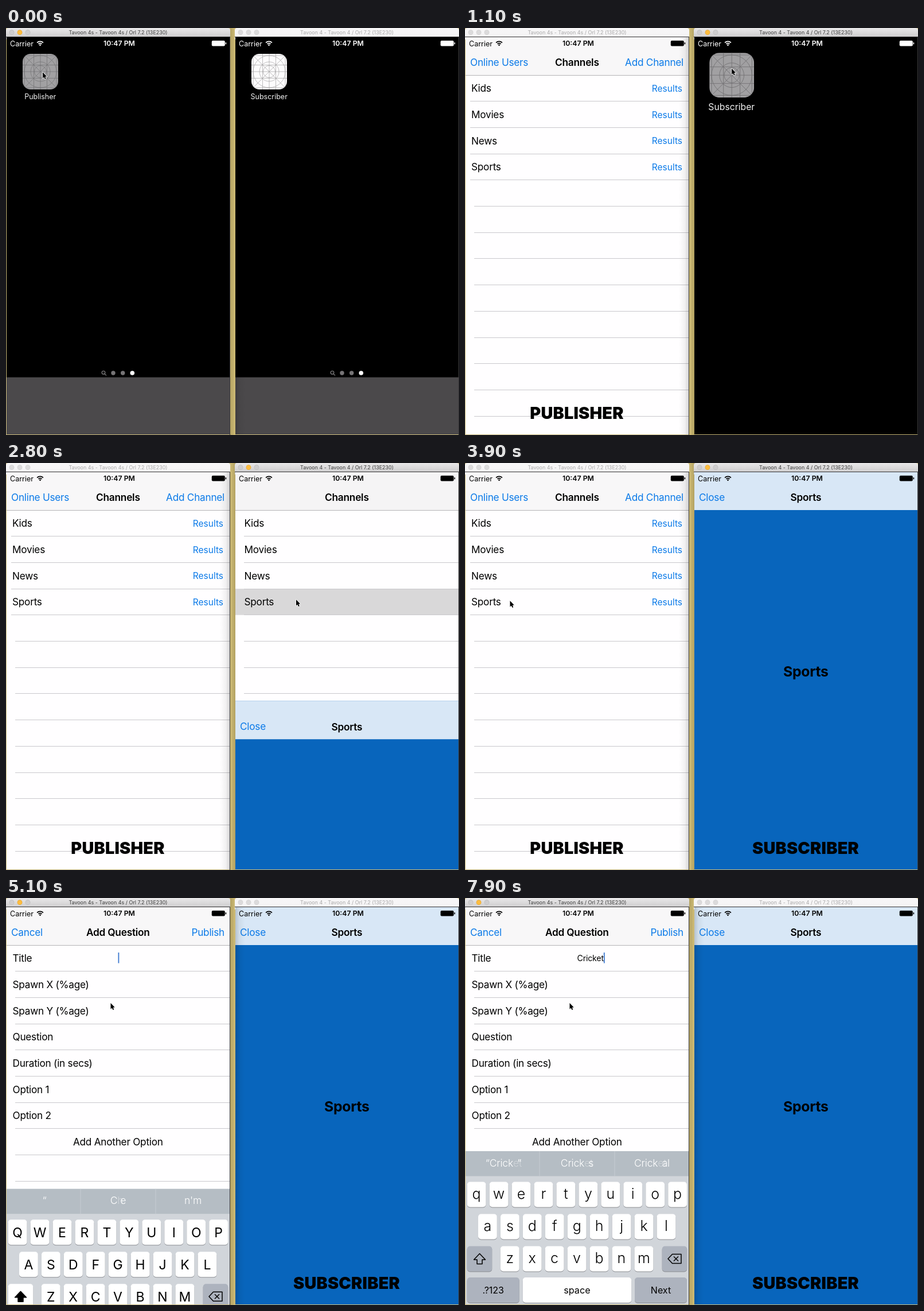
Recreate the animation shown at these times as an HTML page with a canvas. Size 790 px wide and 709 px high, loop 8 s.

```html
<!DOCTYPE html>
<html lang="en">
<head>
<meta charset="utf-8">
<title>Publisher and subscriber</title>
<style>
  html, body { margin: 0; width: 100%; height: 100%; overflow: hidden; background: #c6b574; }
  canvas { display: block; width: 790px; height: 709px; }
</style>
</head>
<body>
<canvas id="stage" width="790" height="709"></canvas>
<script>
const ctx = document.getElementById('stage').getContext('2d');
const LOOP = 8000, ROW = 45.7, NAV = 82;
const BLUE = '#0b7ae8', LINE = '#c9c8cc', SPORT = '#0865bc';
const CHANNELS = ['Kids', 'Movies', 'News', 'Sports'];
const FIELDS = ['Title', 'Spawn X (%age)', 'Spawn Y (%age)', 'Question', 'Duration (in secs)', 'Option 1', 'Option 2'];
const TYPED = 'Cricket', KEY_TIMES = [6300, 6500, 6800, 7000, 7300, 7500, 7750];
const HINTS = [
  [0, '“', 'Ce', "n'm"],
  [5000, '“', 'Che', "n'm"],
  [5300, 'I', 'The', "I'm"],
  [6300, 'r', 'Che', "n'm"],
  [6500, '“Cr”', 'Cry', 'Create'],
  [6800, '“Cri”', 'Cried', 'Crib'],
  [7000, '“Cric”', 'Cricket', 'Crick'],
  [7300, '“Crick”', 'Cricks', 'Crickal'],
  [7800, '“Cricket”', 'Crickets', 'Cricketal']
];
const POINTER = [
  [0, 64, 77], [400, 64, 77], [850, 464, 71], [1100, 465, 70.5], [1350, 465, 72], [1600, 466, 89],
  [1900, 472, 130], [2300, 506, 238], [3400, 506, 238], [3850, 78.5, 240], [4350, 78.5, 240], [4950, 182.5, 183]
];

const clamp = v => Math.min(1, Math.max(0, v));
const lerp = (a, b, k) => a + (b - a) * k;
const span = (t, from, len) => clamp((t - from) / len);
const easeOut = p => 1 - (1 - p) ** 3;
const easeInOut = p => p < .5 ? 4 * p ** 3 : 1 - (2 - 2 * p) ** 3 / 2;

function rect(x, y, w, h, color) {
  ctx.fillStyle = color;
  ctx.fillRect(x, y, w, h);
}
function round(x, y, w, h, r, color) {
  ctx.fillStyle = color;
  ctx.beginPath();
  ctx.roundRect(x, y, w, h, r);
  ctx.fill();
}
function dot(x, y, r, color) {
  ctx.fillStyle = color;
  ctx.beginPath();
  ctx.arc(x, y, r, 0, 7);
  ctx.fill();
}
function path(points, close) {
  ctx.beginPath();
  for (let i = 0; i < points.length; i += 2) ctx.lineTo(points[i], points[i + 1]);
  if (close) ctx.closePath();
}
function font(size, weight = 400, track = -.014) {
  ctx.font = `${weight} ${size}px Inter, "Open Sans", sans-serif`;
  ctx.letterSpacing = track * size + 'px';
}
// y is the middle of the capitals
function text(s, x, y, size, { color = '#000', weight = 400, align = 'left', track = -.014 } = {}) {
  font(size, weight, track);
  ctx.textAlign = align;
  ctx.fillStyle = color;
  ctx.fillText(s, x, y + size * .364);
}
function within(x, y, w, h, draw) {
  ctx.save();
  ctx.beginPath();
  ctx.rect(x, y, w, h);
  ctx.clip();
  draw();
  ctx.restore();
}

function titleBar(label, active) {
  const g = ctx.createLinearGradient(0, 0, 0, 15);
  g.addColorStop(0, active ? '#e9e8e9' : '#f7f6f7');
  g.addColorStop(1, active ? '#cfcecf' : '#f5f4f5');
  round(0, 0, 391, 20, [4, 4, 0, 0], g);
  [10, 24, 38].forEach((x, i) => {
    const lit = active && i === 1;
    dot(x, 7.7, 4.4, lit ? '#e0a032' : active ? '#b9b8b9' : '#cfcecf');
    dot(x, 7.7, 3.8, lit ? '#fdbd3f' : active ? '#cecdce' : '#dcdbdc');
  });
  text(label, 195.5, 7.8, 8.95, { color: active ? '#3c3c3c' : '#a9a8a9', align: 'center', track: 0 });
}

function statusBar(color) {
  text('Carrier', 7, 27, 12.5, { color, track: 0 });
  text('10:47 PM', 197.5, 27, 12.3, { color, weight: 600, align: 'center', track: 0 });
  ctx.strokeStyle = color;
  ctx.lineWidth = 1.7;
  for (const r of [4.4, 7.6]) {
    ctx.beginPath();
    ctx.arc(59.5, 31, r, -Math.PI * .75, -Math.PI * .25);
    ctx.stroke();
  }
  path([59.5, 31.5, 57.6, 29.2, 59.5, 28.5, 61.4, 29.2], true);
  ctx.fillStyle = color;
  ctx.fill();
  round(358.8, 22, 23, 9.6, 2, color);
  round(382.6, 25, 1.6, 3.6, 1, color);
}

function appIcon(pressed) {
  ctx.save();
  ctx.beginPath();
  ctx.roundRect(29, 45, 62, 62, 14);
  ctx.clip();
  rect(29, 45, 62, 62, pressed ? '#a1a0a2' : '#fdfcfd');
  ctx.strokeStyle = pressed ? '#727173' : '#a3a1a3';
  ctx.lineWidth = .7;
  ctx.translate(60, 76);
  for (const d of [-28, -11.5, 0, 11.5, 28]) {
    path([d, -31, d, 31]);
    ctx.stroke();
    path([-31, d, 31, d]);
    ctx.stroke();
  }
  path([-31, -31, 31, 31]);
  ctx.stroke();
  path([-31, 31, 31, -31]);
  ctx.stroke();
  for (const r of [10.5, 17, 28]) {
    ctx.beginPath();
    ctx.arc(0, 0, r, 0, 7);
    ctx.stroke();
  }
  ctx.restore();
}

function home(name, pressed, zoom) {
  rect(0, 15, 391, 694, '#000');
  ctx.save();
  ctx.translate(36, 52);
  ctx.scale(zoom, zoom);
  ctx.translate(-36, -52);
  appIcon(pressed);
  text(name, 59.7, 119.5, 12.5, { color: '#f2f2f2', align: 'center', track: 0 });
  ctx.strokeStyle = '#858485';
  ctx.lineWidth = 1.2;
  ctx.beginPath();
  ctx.arc(170, 600.3, 2.8, 0, 7);
  ctx.stroke();
  path([172, 602.3, 175, 605.3]);
  ctx.stroke();
  dot(187, 601, 3.7, '#777577');
  dot(203.7, 601, 3.7, '#777577');
  dot(220.3, 601, 3.8, '#fff');
  rect(0, 608.5, 391, 101, '#4b494b');
  ctx.restore();
}

function navBar(title, left, right, color = '#f8f7f8') {
  rect(0, 15, 391, NAV - 15, color);
  text(title, 195.3, 60, 17.3, { weight: 600, align: 'center' });
  if (left) text(left, 9, 60, 17.2, { color: BLUE });
  if (right) text(right, 381, 60, 17.2, { color: BLUE, align: 'right' });
}
const caption = s => text(s, 195, 670.5, 28.8, { weight: 900, align: 'center', track: .008 });

function rows(edge) {
  rect(0, NAV, 391, 1, '#b5b4b6');
  for (let i = 1; i < 14; i++) {
    const x = edge(i);
    rect(x, Math.round(NAV + i * ROW - .5), 391 - x, 1, LINE);
  }
}

function channels(pub, loaded, marked) {
  rect(0, 15, 391, 694, '#fffeff');
  if (marked) rect(0, NAV + 3 * ROW, 391, ROW, '#d9d8d9');
  navBar('Channels', pub && 'Online Users', pub && 'Add Channel', pub ? '#f8f7f8' : '#f5f4f5');
  rows(i => pub && loaded && i < 5 ? 9 : 16);
  if (loaded) CHANNELS.forEach((s, i) => {
    const y = NAV + (i + .5) * ROW;
    text(s, pub ? 11 : 16.5, y, 17.2);
    if (pub) text('Results', 379, y + .6, 15.5, { color: BLUE, align: 'right', track: 0 });
  });
  caption(pub ? 'PUBLISHER' : 'SUBSCRIBER');
}

function sports() {
  rect(0, 15, 391, 694, SPORT);
  navBar('Sports', 'Close', '', '#d8e7f6');
  text('Sports', 195.3, 362.5, 24.8, { weight: 700, align: 'center' });
  caption('SUBSCRIBER');
}

function form(t) {
  rect(0, 15, 391, 694, '#fffeff');
  navBar('Add Question', 'Cancel', 'Publish');
  rows(() => 16);
  FIELDS.forEach((s, i) => text(s, 11.5, NAV + (i + .5) * ROW, 17.2));
  text('Add Another Option', 195.3, NAV + 7.5 * ROW, 17.2, { align: 'center' });
  const value = TYPED.slice(0, KEY_TIMES.filter(k => t >= k).length);
  text(value, 195.5, 104.5, 14.2);
  const end = 195.5 + ctx.measureText(value).width;
  const shown = t < 5400 || t > 6200 || (t > 5800 && t < 6100);
  if (shown && t > 4900) rect(end, 95, 1.8, 18.5, '#3c78d0');
}

// Shared ends of the words slide, the middles cross-fade
function morph(a, b, k, x, y) {
  font(17.6, 300);
  ctx.textAlign = 'left';
  const w = s => ctx.measureText(s).width;
  const most = Math.min(a.length, b.length);
  let n = 0, m = 0;
  while (n < most && a[n] === b[n]) n++;
  while (m < most - n && a.at(-1 - m) === b.at(-1 - m)) m++;
  const head = b.slice(0, n), tail = b.slice(b.length - m);
  const start = x - lerp(w(a), w(b), k) / 2, end = x + lerp(w(a), w(b), k) / 2;
  const put = (s, px, alpha) => {
    ctx.fillStyle = `rgba(255,255,255,${alpha})`;
    ctx.fillText(s, px, y);
  };
  put(head, start, 1);
  put(tail, end - w(tail), 1);
  put(a.slice(n, a.length - m), start + w(head), (1 - k) * .6);
  put(b.slice(n, b.length - m), start + w(head), k === 1 ? 1 : k * .7);
}

function key(x, y, w, label, size, color = '#fff') {
  round(x, y + 1, w, 44, 5, '#8b8d92');
  round(x, y, w, 44, 5, color);
  if (label) text(label, x + w / 2, y + 22, size, { align: 'center', track: 0 });
}

function keyboard(t, top) {
  const caps = t < KEY_TIMES[0], gray = '#adb3be';
  ctx.save();
  ctx.translate(0, top);
  rect(0, 0, 391, 270, '#d1d5da');
  rect(0, 0, 391, 43.5, '#b5bdc4');
  rect(129.5, 0, 1, 43.5, '#c6ccd2');
  rect(260.5, 0, 1, 43.5, '#c6ccd2');
  const now = HINTS.findLastIndex(h => t >= h[0]), next = HINTS[now], prev = HINTS[Math.max(0, now - 1)];
  [67, 195.5, 326].forEach((x, i) => morph(prev[i + 1], next[i + 1], span(t, next[0], 200), x, 26.5));
  ['QWERTYUIOP', 'ASDFGHJKL', 'ZXCVBNM'].forEach((line, r) => {
    [...line].forEach((c, i) => {
      const x = [3.7, 23, 61.8][r] + i * 38.95, y = 53.5 + r * 56;
      key(x, y, 32.8);
      ctx.textAlign = 'center';
      font(caps ? 23 : 25, caps ? 400 : 300, 0);
      ctx.fillStyle = '#000';
      ctx.fillText(caps ? c : c.toLowerCase(), x + 16.4, y + (caps ? 30.5 : 29.5));
    });
  });
  key(3.7, 165.5, 43.5, '', 0, caps ? '#fff' : gray);
  path([25.5, 178.5, 35.5, 189, 30, 189, 30, 196.5, 21, 196.5, 21, 189, 15.5, 189], true);
  ctx.lineWidth = 1.5;
  ctx.lineJoin = 'round';
  ctx.strokeStyle = ctx.fillStyle = '#000';
  if (caps) ctx.fill();
  ctx.stroke();
  key(343.7, 165.5, 43.5, '', 0, gray);
  path([354, 187.5, 361.5, 179.5, 377, 179.5, 377, 195.5, 361.5, 195.5], true);
  ctx.stroke();
  path([364, 183.5, 372, 191.5]);
  ctx.stroke();
  path([372, 183.5, 364, 191.5]);
  ctx.stroke();
  key(3.7, 220, 91, '.?123', 16, gray);
  key(100.7, 220, 189.5, 'space', 16.2);
  key(296, 220, 91, 'Next', 16, gray);
  ctx.restore();
}

function launch(name, t, begin, app) {
  const p = span(t, begin, 400), e = easeInOut(p);
  if (p < 1) home(name, t >= begin - 110, 1 + 5.3 * e);
  if (p > .3) {
    ctx.save();
    ctx.globalAlpha = span(p, .3, .35);
    ctx.translate(lerp(29, 0, e), lerp(45, 15, e));
    ctx.scale(lerp(62 / 391, 1, e), lerp(62 / 694, 1, e));
    ctx.translate(0, -15);
    within(0, 15, 391, 694, app);
    ctx.restore();
  }
  return p > .6 ? '#000' : '#fff';
}

function slideUp(t, from, len, draw) {
  const p = span(t, from, len);
  if (!p) return;
  ctx.save();
  ctx.translate(0, 694 * (1 - easeOut(p)));
  draw();
  ctx.restore();
}

function phone(x, label, active, screen) {
  ctx.save();
  ctx.translate(x, 0);
  titleBar(label, active);
  within(1, 15, 389, 693, () => statusBar(screen()));
  rect(0, 15, 391, 1, '#343334');
  rect(390, 15, 1, 694, '#3a393a');
  ctx.restore();
}

function shadow(x, width) {
  const g = ctx.createLinearGradient(x, 0, x + width, 0);
  g.addColorStop(0, 'rgba(0,0,0,.16)');
  g.addColorStop(.4, 'rgba(0,0,0,.05)');
  g.addColorStop(1, 'rgba(0,0,0,0)');
  rect(Math.min(x, x + width), 16, Math.abs(width), 692, g);
}

function pointer(t) {
  const i = Math.max(0, POINTER.findLastIndex(k => t >= k[0]));
  const a = POINTER[i], b = POINTER[i + 1] || a;
  const p = a === b ? 0 : span(t, a[0], b[0] - a[0]), k = p * p * (3 - 2 * p);
  ctx.save();
  ctx.translate(lerp(a[1], b[1], k), lerp(a[2], b[2], k));
  path([0, 0, 0, 10.5, 2.3, 8.4, 4, 12, 5.8, 11.2, 4.2, 7.8, 7.2, 7.6], true);
  ctx.lineJoin = 'round';
  ctx.lineWidth = 1.6;
  ctx.strokeStyle = '#fff';
  ctx.stroke();
  ctx.fillStyle = '#000';
  ctx.fill();
  ctx.restore();
}

function frame() {
  const t = performance.now() % LOOP;
  const leftActive = t < 900 || t >= 4200;
  rect(0, 0, 790, 709, '#c9b97a');
  const gap = ctx.createLinearGradient(391, 0, 400, 0);
  gap.addColorStop(0, leftActive ? '#b3a262' : '#cfbc76');
  gap.addColorStop(1, leftActive ? '#cfbc76' : '#b3a262');
  rect(391, 0, 9, 709, gap);

  phone(0, 'Tavoon 4s - Tavoon 4s / Orl 7.2 (13E230)', leftActive, () => {
    const ink = launch('Publisher', t, 110, () => channels(true, t >= 800, t >= 4300));
    slideUp(t, 4400, 550, () => form(t));
    if (t > 4910) keyboard(t, 441 + 268 * (1 - easeOut(span(t, 4914, 500))));
    return ink;
  });
  phone(399, 'Tavoon 4 - Tavoon 4 / Orl 7.2 (13E230)', !leftActive, () => {
    const ink = launch('Subscriber', t, 1009, () => channels(false, t >= 1500, t >= 2600));
    slideUp(t, 2700, 600, sports);
    return ink;
  });
  if (leftActive) shadow(400, 17);
  else shadow(390, -17);
  pointer(t);
  requestAnimationFrame(frame);
}
frame();
</script>
</body>
</html>
```
